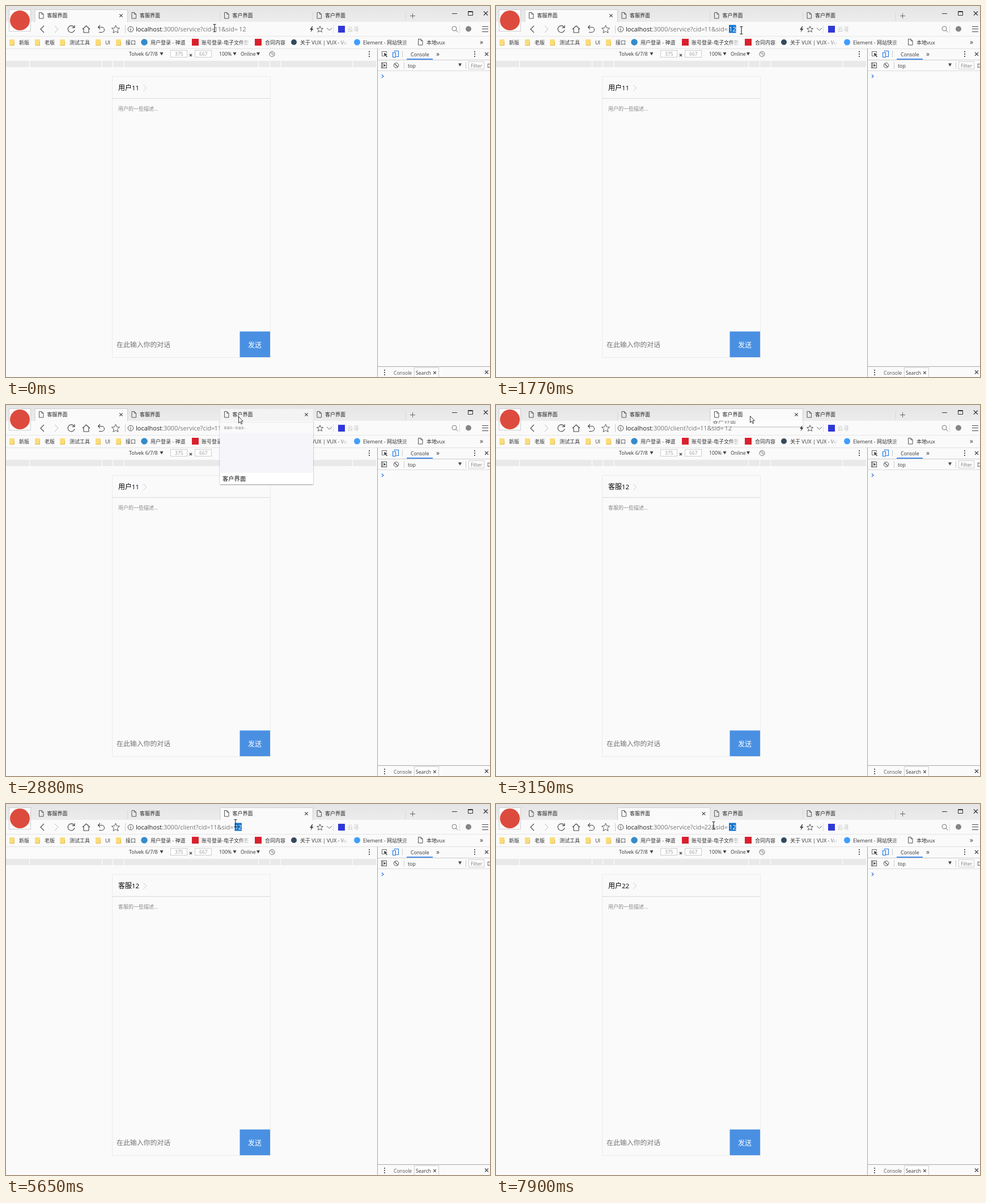
An HTML page that plays this animation: 854x656 px, repeating every 8 s.

```html
<!DOCTYPE html>
<html lang="zh-CN">
<head>
<meta charset="utf-8">
<title>客服界面</title>
<style>
  html, body { margin: 0; width: 100%; height: 100%; overflow: hidden; background: #fafafa; }
  svg { display: block; }
  text { font-family: "Open Sans", "Noto Sans CJK SC", "Noto Sans CJK", "Noto Sans", sans-serif; white-space: pre; }
</style>
</head>
<body>
<svg width="854" height="656" viewBox="0 0 854 656">
  <defs>
    <linearGradient id="fade"><stop stop-color="#fafafa" stop-opacity="0"/><stop offset="1" stop-color="#fafafa"/></linearGradient>
    <linearGradient id="bar" x2="0" y2="1"><stop stop-color="#e5e5e5"/><stop offset="1" stop-color="#ececec"/></linearGradient>
    <clipPath id="below"><rect y="28" width="854" height="160"/></clipPath>
    <filter id="shadow" x="-10%" y="-10%" width="120%" height="120%"><feDropShadow dx="0" dy="1" stdDeviation="1.3" flood-opacity=".4"/></filter>
  </defs>
  <g id="back"></g><g id="live"></g>
</svg>
<script>
const LOOP = 8000, DARK = '#333', LINE = '#ccc';

// Shape helpers
const text = (x, y, s, size = 9, fill = DARK, more = '') =>
  `<text x="${x}" y="${y}" font-size="${size}" fill="${fill}" ${more}>${s.replace(/&/g, '&amp;').replace(/</g, '&lt;')}</text>`;
const rect = (x, y, w, h, fill, more = '') => `<rect x="${x}" y="${y}" width="${w}" height="${h}" fill="${fill}" ${more}/>`;
const box = (x, y, w, h, stroke, fill = 'none') => rect(x + .5, y + .5, w - 1, h - 1, fill, `stroke="${stroke}"`);
const path = (d, stroke = '#555', width = 1, fill = 'none') => `<path d="${d}" stroke="${stroke}" stroke-width="${width}" fill="${fill}"/>`;
const disc = (x, y, r, fill, stroke = 'none') => `<circle cx="${x}" cy="${y}" r="${r}" fill="${fill}" stroke="${stroke}"/>`;
const cross = (x, y, r = 3, c = '#444') => path(`M${x - r} ${y - r}l${2 * r} ${2 * r}m0 ${-2 * r}l${-2 * r} ${2 * r}`, c, 1.2);
const down = (x, y) => path(`M${x - 3} ${y - 3}h6l-3 5.5z`, 'none', 0, '#444');
const dots = (x, y) => [-4, 0, 4].map(d => rect(x - 1, y + d - 1, 2, 2, '#555')).join('');
const page = (x, y) => path(`M${x + .5} ${y + .5}h4.5l3 3v7.5h-7.5zm4.5 0v3h3`, '#555');
const folder = x => rect(x, 59, 9, 11, '#fbdc7a', 'rx="1"') + path(`M${x + 8.5} 63v6.5h-8`, '#e3b94c');
const star = (x, y, r) => {
  const points = Array.from({ length: 10 }, (_, i) => {
    const a = i * Math.PI / 5, d = i % 2 ? r * .45 : r;
    return `${x + d * Math.sin(a)} ${y - d * Math.cos(a)}`;
  });
  return path(`M${points.join('L')}z`);
};

function browserBar() {
  return rect(0, 0, 854, 28, 'url(#bar)') + rect(0, 28, 854, 47, '#fafafa') + rect(0, 53, 854, 1, '#e6e6e6') +
    path('M713 17.5h9M717.5 13v9', '#666') +
    path('M787 13.5h9M815.5 9.5h8v7h-8zM815 10.5h9', '#333') + cross(846.5, 13, 3.5, '#333') +
    path('M67 35l-6 6 6 6', '#444', 1.1) + path('M86 35l6 6-6 6', '#bbb') +
    path('M120.5 38a6 6 0 1 0 .6 4M121 34v4.5h-4.5', '#444', 1.1) +
    path('M135 41l6.5-6 6.5 6M137 40v7h9v-7', '#444', 1.1) +
    path('M166 34l-3.5 3.5 3.5 3.5M163 37.5h6a4.5 4.5 0 0 1 0 9h-5', '#444', 1.1) +
    star(193.5, 41.5, 7.5) + rect(210, 34, 1, 14, '#ccc') +
    disc(220, 41, 4.8, 'none', '#555') + rect(219.5, 40, 1, 4, '#444') + rect(219.5, 38, 1, 1, '#444') +
    path('M540 36l-4 6h2.7l-1.2 4.5 5-6.5h-3l2-4z', 'none', 0, '#444') +
    star(554, 41.5, 5.8) + path('M566 39l4.5 4 4.5-4', '#666') + rect(577, 34, 1, 14, '#ddd') +
    rect(586, 35, 12, 12, '#3038d8') + text(602, 45, '云寻', 10.5, '#c4c4c4') +
    disc(791, 40, 4, 'none', '#777') + path('M794 43l3.5 3.5', '#777') + rect(800, 34, 1, 14, '#ddd') +
    disc(816, 40.5, 5, '#858585') + path('M840 36.5h11M840 40.5h11M840 45.5h11', '#444', 1.2) +
    rect(5.5, 6.5, 38, 38, '#fff', 'stroke="#ccc"') + disc(24.5, 25.5, 17.5, '#dd4b3e');
}

function bookmarks() {
  const folders = [[6, '新版'], [51, '老版'], [95, '测试工具'], [158, 'UI'], [194, '接口']];
  const links = [[255, '用户登录 - 禅道'], [345, '账号登录-电子文件签'], [457, '合同内容'],
    [519, '关于 VUX | VUX - Vu'], [630, 'Element - 网站快速'], [742, '本地vux']];
  return folders.map(([x, s]) => folder(x) + text(x + 17, 67.5, s)).join('') +
    links.map(([x, s]) => text(x, 67.5, s)).join('') +
    disc(244, 64, 5.8, '#368bcb') + rect(328, 58, 12, 12, '#d9202c') + rect(439, 58, 12, 12, '#d9202c') +
    disc(508, 64, 5, '#34495e') + disc(619.5, 64, 5.5, '#409eff') + page(727, 58) +
    [412, 586, 697].map(x => rect(x, 56, 18, 17, 'url(#fade)') + rect(x + 18, 56, 6, 17, '#fafafa')).join('') +
    text(836, 68, '»', 12);
}

function deviceBar() {
  return rect(0, 75, 655, 1, '#e4e4e4') + text(217, 88, 'Tolvek 6/7/8', 9) + down(274.5, 85) +
    box(290, 78, 30, 13, '#ccc', '#fff') + text(298, 88, '375', 8.6, '#999') + cross(326, 87, 2) +
    box(333, 78, 30, 13, '#ccc', '#fff') + text(341, 88, '667', 8.6, '#999') +
    text(376, 88, '100%', 8.7) + down(403.5, 85) + text(414, 88, 'Online', 8.7) + down(445, 85) +
    disc(469.5, 85, 4.6, 'none', '#777') + path('M466 82l7 6.5M468.5 81.5l4 4', '#777') + dots(641, 85) +
    rect(0, 97, 653, 11, '#e9e9e9') +
    [41, 169, 188, 208, 445, 465, 484, 611].map(x => rect(x, 97, 1, 11, '#fff')).join('');
}

function phone() {
  return box(187, 124, 280, 498, '#ebebeb') + rect(187, 163, 279, 1, '#dadada') +
    text(195, 603, '在此输入你的对话', 11.9, '#757575') +
    rect(412.5, 575.5, 53.5, 45.5, '#4a90e2') + text(427, 603.5, '发送', 12, '#fff');
}

function devtools() {
  return rect(655, 75, 1, 581, '#a8a8a8') + rect(656, 75, 198, 1, '#e0e0e0') +
    rect(656, 95, 198, 1, LINE) + rect(656, 114, 198, 1, '#ddd') +
    path('M671.5 83v-2.5h-8v8h3', '#666') + path('M667 83l6 2.5-2.5 1 2.5 3-1.2 1-2.6-3-1.6 2z', 'none', 0, '#444') +
    path('M685.5 81v-1.5h7v10h-4M682.5 82.5h5v8h-5z', '#1a73e8', 1.1) + rect(699, 79, 1, 12, LINE) +
    text(714, 88.5, 'Console', 8.7) + rect(707, 93, 46, 2, '#4a8fe8') + text(759, 89, '»', 12) +
    dots(827, 85) + cross(848, 85) +
    box(662, 100, 10, 10, '#555') + path('M664.5 101v8', '#555') + path('M666.5 102.5l4 2.5-4 2.5z', 'none', 0, '#444') +
    disc(688.5, 105, 4.3, 'none', '#555') + path('M685.5 102l6 6', '#555', 1.2) + rect(702, 99, 1, 12, LINE) +
    text(709, 108.5, 'top', 8.8) + down(801, 104.5) + rect(811, 99, 1, 12, LINE) +
    box(816, 98, 28, 14, '#ccc', '#fff') + text(820, 108.5, 'Filter', 8.6, '#777') + text(849, 108.5, 'D', 8.8) +
    path('M663 121.5l3 2.7-3 2.7', '#3879d9', 1.3) +
    rect(656, 637, 198, 1, '#a8a8a8') + dots(668, 648) + text(684, 651.5, 'Console', 8.6, '#555') +
    box(720, 639, 44, 18, '#ccc', '#fff') + text(723, 651.5, 'Search', 8.6) + cross(756.5, 648.5, 2.3) + cross(848, 647.5);
}

// Tabs: title, address, contact shown in the page
const tabs = [
  { title: '客服界面', path: 'service', cid: '11', who: '用户' },
  { title: '客服界面', path: 'service', cid: '22', who: '用户' },
  { title: '客户界面', path: 'client', cid: '11', who: '客服' },
  { title: '客户界面', path: 'client', cid: '22', who: '客服' }
];
const tabX = i => 51 + 163.5 * i;
const contact = tab => tab.who === '用户' ? tab.cid : '12';

const ticks = [0, 120, 240, 400, 560, 740, 920, 1190, 1340, 1490, 1620, 1770, 1920, 2040, 2160,
  2310, 2460, 2580, 2730, 2880, 3030, 3150, 3270, 3390, 3540, 3660, 3810, 3960, 4110, 4260, 4390,
  4820, 4970, 5090, 5650, 5770, 5920, 6070, 6220, 6370, 6520, 6670, 6820, 7200, 7500, 7620, 7900];

// Pointer: time, x, y
const pointer = [[0, 368, 39], [560, 424, 46], [920, 420, 42], [1190, 411, 41], [1620, 434, 43], [1770, 433, 43],
  [2160, 247, 15], [2580, 307, 21], [2880, 410, 20], [3150, 448, 19], [3270, 447, 26], [3390, 436, 38],
  [3660, 376, 40], [3960, 362, 40], [4390, 404, 40], [4820, 406, 40], [5090, 434, 40], [5650, 405, 34],
  [5920, 302, 13], [6070, 300, 13], [6220, 312, 20], [6370, 365, 37], [6670, 421, 40], [6820, 406, 39],
  [7200, 413, 39], [7500, 400, 39], [7620, 387, 39], [7900, 383.5, 38]];

const activeTab = [[0, 0], [3030, 2], [5920, 1]];
const selection = [[0, ''], [1490, 'sid'], [3030, ''], [3810, 'cid'], [4820, ''], [4970, 'sid'], [5920, ''], [6820, 'sid']];
// Hover preview: time, tab, vertical shift
const preview = [[0, -1, 0], [2460, 1, -60], [2580, 1, 0], [2880, 2, -20], [3030, 2, -75], [3150, 2, -122], [3270, -1, 0]];

const at = (steps, t) => steps.findLast(step => step[0] <= t);

function pointerAt(t) {
  const i = pointer.findLastIndex(p => p[0] <= t), a = pointer[i], b = pointer[i + 1] || a;
  const k = b === a ? 0 : (t - a[0]) / (b[0] - a[0]);
  return [a[1] + (b[1] - a[1]) * k, a[2] + (b[2] - a[2]) * k].map(Math.round);
}

function drawTabs(active, [px, py]) {
  return tabs.map((tab, i) => {
    const x = tabX(i), on = i === active, hover = py < 28 && px >= x && px < x + 163.5;
    const back = on ? rect(x, 6.5, 163.5, 22, '#fafafa', 'stroke="#d0d0d0"') + rect(x, 28, 163.5, 2, '#fafafa')
      : hover ? rect(x, 7, 163.5, 21, '#f3f3f3') : rect(x + 163, 11, 1, 16, '#d8d8d8');
    return back + page(x + 7, 11) + text(x + 21.5, 20, tab.title, 9, '#222') +
      (on || hover ? cross(x + 152, 17, 2.7) : '');
  }).join('');
}

function drawAddress(tab, picked) {
  const cidX = tab.path === 'service' ? 367.5 : 360, sidX = cidX + 43.5;
  const value = (name, x, s) => (picked === name ? rect(x, 33.5, 12.5, 14, '#1274d0') : '') +
    text(x, 45, s, 11, picked === name ? '#fff' : '#777');
  return `<text x="229" y="45" font-size="11" fill="#777"><tspan fill="#222">localhost</tspan>:3000/${tab.path}?cid=</text>` +
    text(cidX + 12.5, 45, '&sid=', 11, '#777') + value('cid', cidX, tab.cid) + value('sid', sidX, '12');
}

function drawContact(tab) {
  const n = contact(tab);
  return text(198, 149, tab.who, 12, '#000') + text(222, 149, n, 11.4, n === '11' ? '#003' : '#000') +
    path('M242.5 139.5l5 5.5-5 5.5', '#ccc') + text(198, 184.5, tab.who + '的一些描述...', 9, '#888');
}

function drawPreview([, i, shift]) {
  if (i < 0) return '';
  const tab = tabs[i], x = tabX(i) - .5;
  return `<g clip-path="url(#below)"><g transform="translate(${x} ${shift})" opacity="${shift < -100 ? .6 : 1}">` +
    rect(0, 28, 164.5, 132, '#fff', 'filter="url(#shadow)"') + rect(0, 30, 164.5, 39, '#fafafa') +
    rect(0, 50, 164.5, 1, '#e8e8e8') + rect(0, 69, 164.5, 71, '#f5f5fa') +
    text(7, 44, tab.who + contact(tab), 6.2, '#222') + path('M33.5 39.5l2 2.3-2 2.3', '#ccc', .8) +
    text(7, 62, tab.who + '的一些描述...', 5, '#888') + text(4.5, 153.7, tab.title, 10.3, '#111') + '</g></g>';
}

function drawPointer([x, y]) {
  return y < 28
    ? path(`M${x + .5} ${y + .5}v11.5l2.6-2.4 1.9 4.2 1.8-.8-1.9-4.1h3.4z`, '#222', .9, '#fff')
    : path(`M${x - 2.5} ${y - 6.5}h2l.5 .5 .5-.5h2M${x} ${y - 6}v12M${x - 2.5} ${y + 6.5}h2l.5-.5 .5 .5h2`, '#222', 1.1);
}

function scene(t) {
  const active = at(activeTab, t)[1], pos = pointerAt(t), tab = tabs[active];
  return drawTabs(active, pos) + drawAddress(tab, at(selection, t)[1]) + drawContact(tab) +
    drawPreview(at(preview, t)) + drawPointer(pos);
}

const live = document.getElementById('live');
document.getElementById('back').innerHTML = browserBar() + bookmarks() + deviceBar() + phone() + devtools();

const start = performance.now();
let shown = -1;
function frame() {
  const now = (performance.now() - start) % LOOP;
  const tick = ticks.findLast(t => t <= now);
  if (tick !== shown) live.innerHTML = scene(shown = tick);
  requestAnimationFrame(frame);
}
frame();
</script>
</body>
</html>
```
